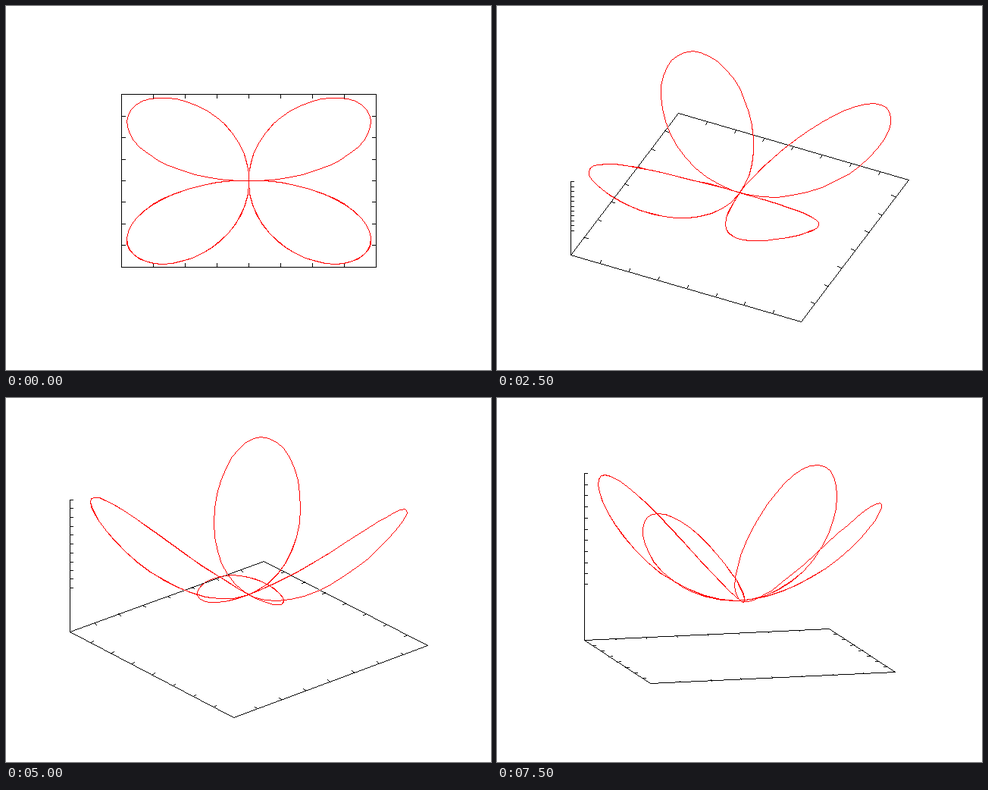
Write a matplotlib script that moves like this. It is 640 by 480 pixels and loops after 8000 ms.

```python
import numpy as np
import matplotlib.pyplot as plt
from matplotlib.animation import FuncAnimation

W, H = 640, 480
CENTER = np.array([320, 230])     # screen position of the box centre
SCALE = np.array([168, -114.5])   # pixels per unit of the scaled box
LIMIT = 0.8                       # x and y run from -LIMIT to LIMIT
FRAMES, STEP = 16, 5              # degrees turned per frame, tilt and spin alike
TIC = 5
BLACK, RED = (0, 0, 0), (255, 0, 0)

# Four-leaved rose lifted onto a paraboloid
t = np.linspace(-5, 5, 200)
r = np.sin(2 * t)
ROSE = np.column_stack([r * np.cos(t) / LIMIT,
                        r * np.sin(t) / LIMIT,
                        (4 * r**2 - 1) / 3])

CORNERS = np.array([(-1, -1, -1), (1, -1, -1), (1, 1, -1),
                    (-1, 1, -1), (-1, -1, -1)], float)


def view(points, angle):
    """Tilt and spin by the same angle; returns right and up components."""
    x, y, z = np.asarray(points, float).T
    c, s = np.cos(angle), np.sin(angle)
    return np.column_stack([x * c + y * s, (y * c - x * s) * c + z * s])


def project(points, angle):
    """Offsets from the centre in pixels."""
    return view(points, angle) * SCALE


def stroke(img, path, color):
    """One pixel wide polyline; offsets are cut to whole pixels."""
    path = CENTER + np.trunc(np.round(path, 6)).astype(int)
    for a, b in zip(path[:-1], path[1:]):
        n = max(np.abs(b - a).max(), 1)
        k = np.arange(n + 1)[:, None] / n
        x, y = np.floor(a + (b - a) * k + 0.5).astype(int).T
        img[y, x] = color


def tics(img, angle):
    for axis in (0, 1):
        for side in (-1, 1):
            inward = np.zeros(3)
            inward[1 - axis] = -side
            step = view([inward], angle)[0] * [TIC, -TIC]
            for v in np.arange(-3, 4) / 4:
                p = np.full(3, -1.0)
                p[axis], p[1 - axis] = v, side
                start = project([p], angle)[0]
                stroke(img, [start, start + step], BLACK)
    for v in np.linspace(-1 / 3, 1, 11):
        start = project([(-1, -1, v)], angle)[0]
        stroke(img, [start, start + [TIC - 1, 0]], BLACK)


def render(i):
    angle = np.radians(STEP * i)
    img = np.full((H, W, 3), 255, np.uint8)
    stroke(img, project(CORNERS, angle), BLACK)
    stroke(img, project([(-1, -1, -1), (-1, -1, 1)], angle), BLACK)
    tics(img, angle)
    stroke(img, project(ROSE, angle), RED)
    return img


fig = plt.figure(figsize=(W / 100, H / 100), dpi=100, facecolor="white")
picture = fig.figimage(render(0), origin="upper")


def update(i):
    picture.set_data(render(i))
    return [picture]


anim = FuncAnimation(fig, update, frames=FRAMES, interval=500,
                     repeat=True, repeat_delay=0)
plt.show()
```
